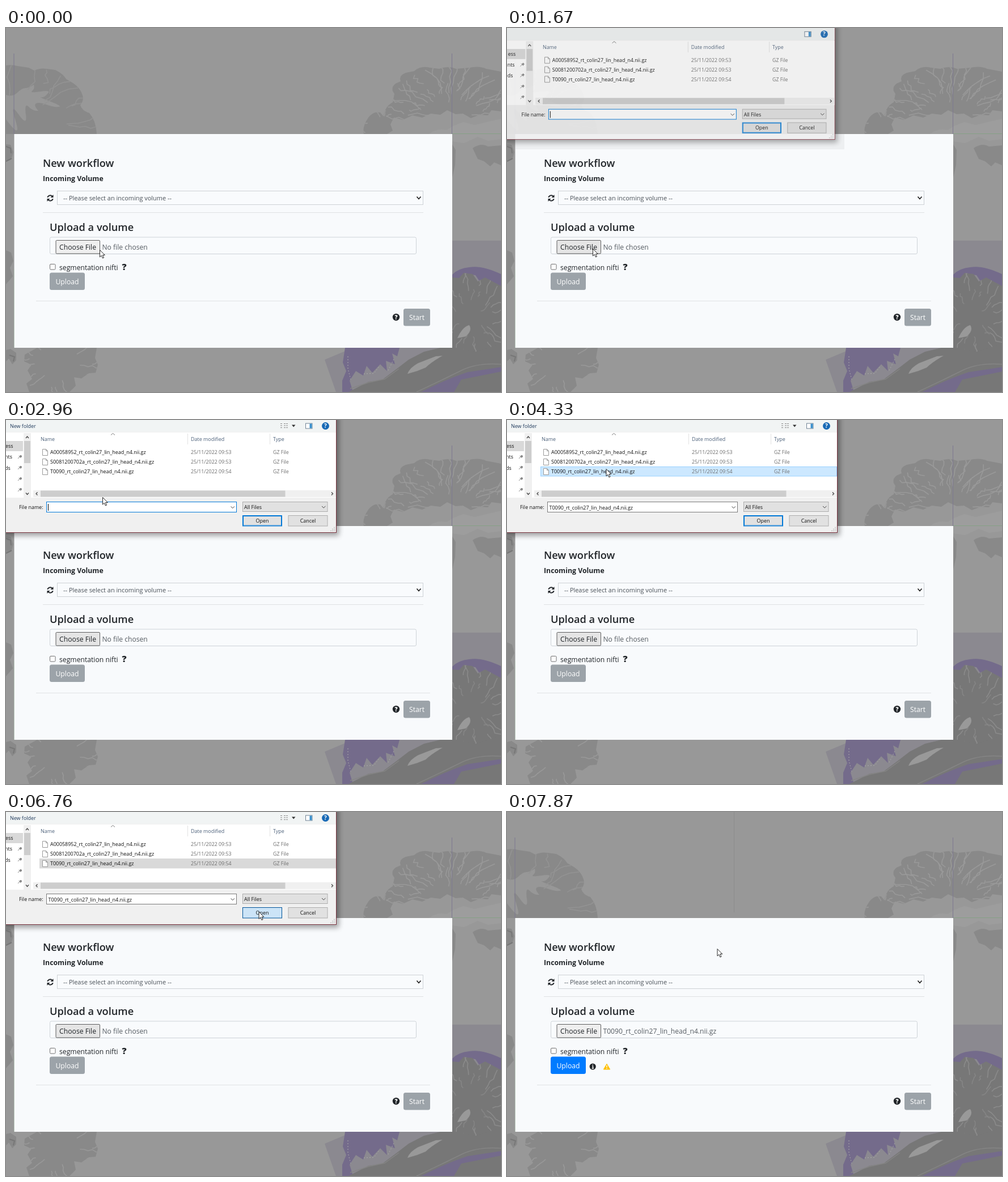
These frames come from a looping animation (873x642 px, 8 s). An HTML page:

```html
<!DOCTYPE html>
<html lang="en">
<head>
<meta charset="utf-8">
<title>New workflow</title>
<style>
html, body { margin: 0; width: 100%; height: 100%; overflow: hidden; background: #989898; }
svg { display: block; width: 873px; height: 642px; font-family: "Open Sans", "Noto Sans", sans-serif; font-size: 12.2px; fill: #212529; }
.small { font-size: 8.95px; fill: #111; }
.dim { fill: #6d6d6d; font-size: 8.8px; }
.head { fill: #4c607a; }
.title { font-size: 18.2px; font-weight: 600; }
.mid { text-anchor: middle; }
.line { fill: none; }
.line:not([stroke]) { stroke: #444; }
</style>
</head>
<body>
<svg viewBox="0 0 873 642">
  <defs>
    <filter id="blur" x="-10%" y="-20%" width="120%" height="140%"><feGaussianBlur stdDeviation="5"/></filter>
    <clipPath id="clipA"><path id="shapeA" d="M0 66Q10 64 20 67L40 70 50 75Q60 70 72 72L87 74Q101 81 106 90L118 97Q130 105 134 116 139 126 131 136 134 146 147 150 159 164 160 187H0Z"/></clipPath>
    <clipPath id="clipB"><path id="shapeB" d="M631 187Q628 174 639 158 648 146 660 149L666 156Q668 138 682 131L685 116Q677 106 687 98L696 94Q692 84 705 79L720 76Q731 66 748 70L764 72Q780 66 794 72L817 70Q835 66 847 72L873 77V147L856 145 850 154 835 153 820 159 806 151 793 152 778 145 766 153 749 151 734 158 717 154 700 162 684 158 678 170 682 181 672 187Z"/></clipPath>
    <clipPath id="clipC"><path id="shapeC" d="M33 576L55 564H160L157 582 162 594 158 608 146 609 133 618 120 616 123 631 112 642H41L36 627 46 619 38 604 45 594 32 588Z"/></clipPath>
    <clipPath id="clipD"><path id="shapeD" d="M787 440L799 441 807 432 823 434 832 447 845 440 873 455V582L787 574Z"/></clipPath>
  </defs>

  <rect width="873" height="642" fill="#989898"/>
  <g id="brains">
    <use href="#shapeA" fill="#898989"/>
    <g id="sulciA" clip-path="url(#clipA)">
      <path d="M0 118Q12 122 20 114T34 106 49 100Q51 107 46 111T61 112 73 116Q68 123 62 122T79 130 92 139Q84 140 71 135T53 133 57 146Q48 147 40 139T35 153 22 152 17 164 0 161Z" fill="#979797"/>
    </g>
    <use href="#shapeB" fill="#898989"/>
    <g id="sulciB" clip-path="url(#clipB)"/>
    <use href="#shapeC" fill="#898989"/>
    <g id="sulciC" clip-path="url(#clipC)"/>
    <path d="M0 205L8 206 13 219 9 232 0 236ZM0 392L9 396 13 411 7 423 12 438 0 452ZM0 568L8 566 18 573 18 586 11 593 5 583 0 588ZM787 205L793 215 792 242 787 264ZM823 212Q838 202 850 209L873 207V242L861 237 854 244 843 235 832 231Z" fill="#898989"/>
    <path d="M0 209l8 3 1 9M6 577l9 3-2 8M0 235l10-5" class="line" stroke="#777" stroke-width="2"/>
    <path d="M746 187Q759 176 777 180L790 172 807 166 826 171 873 160V196L850 199 832 192 808 203 787 200Z" fill="#9d9d9d"/>

    <path d="M787 375H873V642H582L562 585 612 564H787Z" fill="#8b8990"/>
    <path d="M787 435Q797 424 817 422 839 418 873 434V470L854 450 840 454 828 436 811 434 796 447 787 444ZM598 564H694L690 579 681 574 686 593 670 587 672 605 660 593 646 608 636 596 630 613 617 605 606 622 612 642H593V622L600 605 594 590Z" fill="#746b8b"/>
    <path d="M603 579V601L608 620M631 610L649 609 658 597M674 604L684 584" class="line" stroke="#aaa" stroke-dasharray="2 3"/>
    <use href="#shapeD" fill="#777"/>
    <g id="sulciD" clip-path="url(#clipD)"/>
    <path d="M604 642L639 624 664 620 688 602 710 585 737 571 766 564H795L828 571 873 557V642Z" fill="#777"/>
    <path d="M607 636L640 625 668 619 693 601M724 642Q775 618 803 604T873 593" class="line" stroke="#858585" stroke-width="1.500"/>
    <path d="M732 642Q775 620 814 607L873 598V642Z" fill="#746b8b"/>
    <path d="M803 620L873 606V642H790Z" fill="#777"/>
    <path d="M708 610Q712 599 727 591L758 579 770 578Q750 589 740 599L725 605ZM796 547Q805 527 817 524 823 533 811 544Z" fill="#999"/>
    <path d="M14 45V187M786.5 45V187" class="line" stroke="#7d7990"/>
    <path d="M787 186.500H873M14.500 425V564" class="line" stroke="#86a086"/>
  </g>

  <rect x="14.500" y="187" width="772.500" height="377" fill="#f8fafc"/>
  <path id="seam" class="line" stroke="#8d8d8d"/>
  <path id="shade" d="M15 187H595V214H15Z" fill="#000"/>

  <text x="65" y="244.500" class="title">New workflow</text>
  <text x="65" y="269.500" font-size="12.3" font-weight="700">Incoming Volume</text>
  <g fill="none" stroke="#212529" stroke-width="1.900">
    <path d="M73.300 298.800A4.900 4.900 0 0 1 81.800 297M82.700 301.200A4.900 4.900 0 0 1 74.200 303"/>
    <path d="M83.500 294V299H78.500ZM72.500 306V301H77.500Z" fill="#212529" stroke="none"/>
  </g>
  <rect x="90.500" y="287.500" width="645" height="24" fill="#f9fbfd" stroke="#ced2d6"/>
  <text x="101" y="304.300" font-size="10.94" fill="#495057">-- Please select an incoming volume --</text>
  <path d="M724.500 297.500L728 301.500 731.500 297.500" class="line" stroke="#222" stroke-width="1.700"/>
  <path d="M65 325.500H736M53 481.500H748" stroke="#e0e2e4"/>

  <text x="77" y="358" class="title">Upload a volume</text>
  <rect x="77.500" y="369" width="646" height="29.500" rx="2.500" fill="#f9fbfd" stroke="#ced3d8"/>
  <rect id="choose" x="88" y="374.500" width="77.500" height="23.500" rx="1.500" stroke="#5d5d5d"/>
  <text x="94" y="391">Choose File</text>
  <text id="chosen" x="169.500" y="391" fill="#565c62" font-size="12.1">No file chosen</text>
  <rect x="77.500" y="416.500" width="9.500" height="9.500" rx="1.500" fill="#fff" stroke="#707070"/>
  <text x="94" y="426.500">segmentation nifti</text>
  <text x="204.500" y="427" font-size="16" font-weight="800">?</text>
  <rect id="upload" x="77" y="431.500" width="62" height="30.500" rx="3.500"/>
  <text x="108" y="451.500" class="mid" fill="#fff">Upload</text>
  <g id="notes">
    <circle cx="151.200" cy="449" r="5.600"/>
    <path d="M150.200 447.800H151.500V452M149.600 452H153M151.300 444.900V446.300" class="line" stroke="#fff" stroke-width="1.300"/>
    <path d="M176 444.300L181.700 454H170.300Z" fill="#ffc107" stroke="#ffc107" stroke-linejoin="round"/>
    <path d="M176 446.700V450.300M176 451.600V453" class="line" stroke="#fff" stroke-width="1.400"/>
  </g>
  <circle cx="688" cy="510" r="6.200"/>
  <text x="688" y="513.700" class="mid" fill="#fff" font-size="10" font-weight="800">?</text>
  <rect x="701" y="495" width="47" height="30.500" rx="3.500" fill="#9ca3a9"/>
  <text x="724.500" y="515" class="mid" fill="#fff">Start</text>

  <g id="dialog" class="small">
    <rect x="-30" y="-30" width="617" height="234" fill="#000" opacity=".36" filter="url(#blur)"/>
    <rect x="-20" y="-20" width="602.500" height="218.500" fill="#f0f0f0" stroke="#7b3440"/>
    <rect x="-20" y="-20" width="602" height="41" fill="#f1f4f4"/>
    <rect x="-20" y="22" width="602" height="115" fill="#fff"/>
    <g id="tools">
      <text x="7" y="13.500" fill="#1e395b">New folder</text>
      <path d="M484 6.500h4M484 10h4M484 13.500h4M490 6.500h7M490 10h7M490 13.500h7" class="line" stroke="#888" stroke-dasharray="3 1"/>
      <path d="M504 8.500H510.500L507.200 12.500Z" fill="#333"/>
    </g>
    <rect x="528.500" y="6" width="11.500" height="9" fill="#fff" stroke="#6f8294"/>
    <rect x="535.500" y="6.500" width="4" height="8" fill="#3c91ce"/>
    <circle cx="563.500" cy="10.500" r="6.500" fill="#1769b5"/>
    <text x="563.500" y="14" class="mid" fill="#fff" font-size="10" font-weight="700">?</text>

    <rect x="-20" y="37" width="50" height="18" fill="#d9d9d9"/>
    <text x="-1" y="48.800">ess</text><text x="-2" y="68">nts</text><text x="-2" y="87.500">ds</text>
    <g id="pins"/>
    <rect x="31" y="23" width="13" height="114" fill="#f0f0f0"/>
    <rect x="32" y="37" width="11" height="39" fill="#cdcdcd"/>
    <path d="M35 32L37.500 29 40 32M35 128.500L37.500 131.500 40 128.500" class="line" stroke-width="1.300"/>
    <path d="M320.500 24V43M465.500 24V43" stroke="#e2e2e2"/>
    <path d="M185 26.500L188.500 23.500 192 26.500" class="line" stroke="#777"/>
    <text x="61" y="37" class="head">Name</text><text x="326" y="37" class="head">Date modified</text><text x="471" y="37" class="head">Type</text>
    <rect id="row" x="59.500" y="82.500" width="522" height="16.500"/>
    <g id="files"/>

    <rect x="48" y="124" width="534" height="12" fill="#f0f0f0"/>
    <rect id="thumb" x="61" y="124.500" width="431.500" height="11"/>
    <path d="M55.500 127.500L53 130 55.500 132.500M574 127.500L576.500 130 574 132.500" class="line" stroke-width="1.300"/>
    <text x="23" y="157">File name:</text>
    <rect id="field" x="71.500" y="144.500" width="335" height="18" fill="#fff"/>
    <text id="entry" x="74.500" y="157.500">T0090_rt_colin27_lin_head_n4.nii.gz</text>
    <path id="caret" d="M74.500 148V160" stroke="#000"/>
    <rect x="417.500" y="144.500" width="149.500" height="17" fill="#e1e1e1" stroke="#adadad"/>
    <text x="420" y="157">All Files</text>
    <path d="M396.500 152.500L399.700 155.500 403 152.500M557 152L560.200 155 563.500 152" class="line"/>
    <rect id="open" x="417.500" y="168.500" width="69" height="18.500"/>
    <rect id="ring" x="418.500" y="169.500" width="67" height="16.500" fill="none" stroke="#0078d7"/>
    <text x="452" y="181" class="mid">Open</text>
    <rect x="498" y="168.500" width="69" height="18.500" fill="#e1e1e1" stroke="#adadad"/>
    <text x="532.500" y="181" class="mid">Cancel</text>
    <path d="M572 195.500h8M575 192.500h5M578 189.500h2" class="line" stroke="#c2c2c2" stroke-width="1.500" stroke-dasharray="2 1"/>
  </g>
  <path id="cursor" d="M.5 .5V13L3.400 10.300 5.400 15 7.500 14.100 5.500 9.500H9.300Z" fill="#fff" stroke="#111" stroke-width=".9"/>
</svg>
<script>
const $ = id => document.getElementById(id);
const LOOP = 8000;

const ticks = [0, 150, 270, 390, 820, 940, 1090, 1390, 1540, 1670, 1800, 1920, 2050, 2300,
  2440, 2570, 2690, 2830, 2960, 3080, 3210, 3360, 3510, 3970, 4090, 4210, 4330, 4450, 4580,
  4720, 4840, 4970, 5120, 5250, 5390, 5510, 5640, 5800, 5950, 6080, 6200, 6330, 6760, 6910,
  7050, 7170, 7300, 7440, 7580, 7720, 7870];

// time, x, y
const path = [[0, 165, 391], [390, 151, 389], [1800, 151, 389], [2050, 179, 320], [2300, 181, 275],
  [2690, 183, 165], [2960, 170, 136], [3360, 174, 88], [4330, 174.500, 86], [4720, 177, 83],
  [4970, 205, 112], [5250, 250, 121], [5640, 370, 142], [6080, 446, 173], [6330, 445.500, 175.500],
  [7300, 445.500, 175.500], [7440, 438, 184], [7720, 398, 219], [7870, 370.500, 241]];

function along(t) {
  const i = path.findIndex(p => p[0] > t);
  if (i < 0) return path[path.length - 1].slice(1);
  const [a, b] = [path[i - 1], path[i]], k = (t - a[0]) / (b[0] - a[0]);
  return [a[1] + (b[1] - a[1]) * k, a[2] + (b[2] - a[2]) * k];
}

let seed = 7;
const rnd = () => (seed = seed * 16807 % 2147483647) / 2147483647;

// Winding folds that run inwards from the rim of an ellipse.
function sulci(id, cx, cy, rx, ry, from, to, n, color) {
  let d = "";
  for (let i = 0; i < n; i++) {
    let a = (from + (to - from) * (i + rnd()) / n) * Math.PI / 180;
    const depth = .2 + rnd() * .35;
    for (let j = 0; j < 6; j++) {
      const r = 1.03 - depth * j / 5;
      d += `${j ? "L" : "M"}${(cx + rx * r * Math.cos(a)).toFixed(1)} ${(cy + ry * r * Math.sin(a)).toFixed(1)}`;
      a += (rnd() - .5) * .14;
    }
  }
  $(id).innerHTML += `<path d="${d}" fill="none" stroke="${color}" stroke-width="1.600" stroke-linejoin="round"/>`;
}
sulci("sulciA", 10, 175, 145, 108, -90, 0, 10, "#939393");
sulci("sulciB", 785, 165, 112, 96, -180, 0, 24, "#999");
sulci("sulciB", 785, 165, 75, 66, -180, 0, 14, "#999");
sulci("sulciB", 660, 185, 32, 40, -180, -10, 6, "#999");
sulci("sulciC", 95, 590, 70, 58, 0, 360, 18, "#999");
sulci("sulciD", 820, 510, 62, 78, 0, 360, 22, "#8b8b8b");
sulci("sulciD", 820, 510, 38, 48, 0, 360, 10, "#858585");

$("pins").innerHTML = [65, 84, 104, 123].map(y =>
  `<path d="M21 ${y + 3}l3-3M22.500 ${y - 2}l4 4M24 ${y - 1}l2-2 2 2-2 2z" fill="#888" stroke="#888"/>`).join("");

$("files").innerHTML = [["A00058952", 53], ["S0081200702a", 53], ["T0090", 54]].map(([name, min], i) => {
  const y = 57 + i * 17;
  return `<path d="M64.500 ${y - 5.500}h6l3 3v8h-9zM70.500 ${y - 5.500}v3h3" fill="#fff" stroke="#999"/>
    <text x="78" y="${y + 3.200}">${name}_rt_colin27_lin_head_n4.nii.gz</text>
    <text x="326" y="${y + 3.200}" class="dim">25/11/2022 09:${min}</text>
    <text x="471" y="${y + 3.200}" class="dim">GZ File</text>`;
}).join("");

const show = (id, on) => $(id).setAttribute("visibility", on ? "inherit" : "hidden");
function paint(id, fill, stroke) {
  $(id).setAttribute("fill", fill);
  if (stroke) $(id).setAttribute("stroke", stroke);
}

// opacity and scale of the file dialog
function windowState(t) {
  if (t < 1390 || t >= 7050) return [0, 1];
  if (t < 1540) return [.25, .95];
  if (t < 1670) return [.6, .974];
  if (t < 1800) return [.86, .988];
  return t < 6910 ? [1, 1] : [.35, .96];
}

function draw(time) {
  const t = ticks.filter(k => k <= time).pop();
  const [x, y] = along(t);
  $("cursor").setAttribute("transform", `translate(${x} ${y})`);

  const [alpha, s] = windowState(t);
  $("dialog").setAttribute("opacity", alpha);
  $("dialog").setAttribute("transform", `translate(229 40) scale(${s}) translate(-229 -40)`);
  show("dialog", alpha > 0);
  show("tools", t >= 1800);
  show("seam", t >= 7050);
  $("seam").setAttribute("d", t >= 7720 ? "M400.500 0V177" : "M400.500 0V187");
  $("shade").setAttribute("opacity", alpha < 1 ? .05 * alpha : 0);

  const picked = t >= 3970, pressed = t >= 6760, aimed = t >= 6200;
  const over = y > 82 && y < 99;
  show("row", picked || over);
  if (pressed) paint("row", "#d9d9d9", "#d9d9d9");
  else if (picked) paint("row", "#cce8ff", over ? "#99d1ff" : "#cce8ff");
  else paint("row", "#e5f3ff", "#e5f3ff");
  paint("thumb", y > 124 && y < 135 ? "#a6a6a6" : "#cdcdcd");
  paint("field", "#fff", picked ? "#7a7a7a" : "#0078d7");
  show("entry", picked);
  show("caret", t < 3510);
  show("ring", !aimed);
  if (pressed) paint("open", "#cce4f7", "#005499");
  else paint("open", aimed ? "#e5f1fb" : "#e1e1e1", "#0078d7");

  const done = t >= 7300;
  const click = t >= 820 && t < 1090;
  paint("choose", click ? "#f5f5f5" : t < 150 || done ? "#efefef" : "#e5e5e5", click ? "#8d8d8d" : "#5d5d5d");
  $("chosen").textContent = done ? $("entry").textContent : "No file chosen";
  paint("upload", done ? "#007bff" : "#9ca3a9");
  show("notes", done);
}

const start = performance.now();
function frame() {
  draw((performance.now() - start) % LOOP);
  requestAnimationFrame(frame);
}
frame();
</script>
</body>
</html>
```
